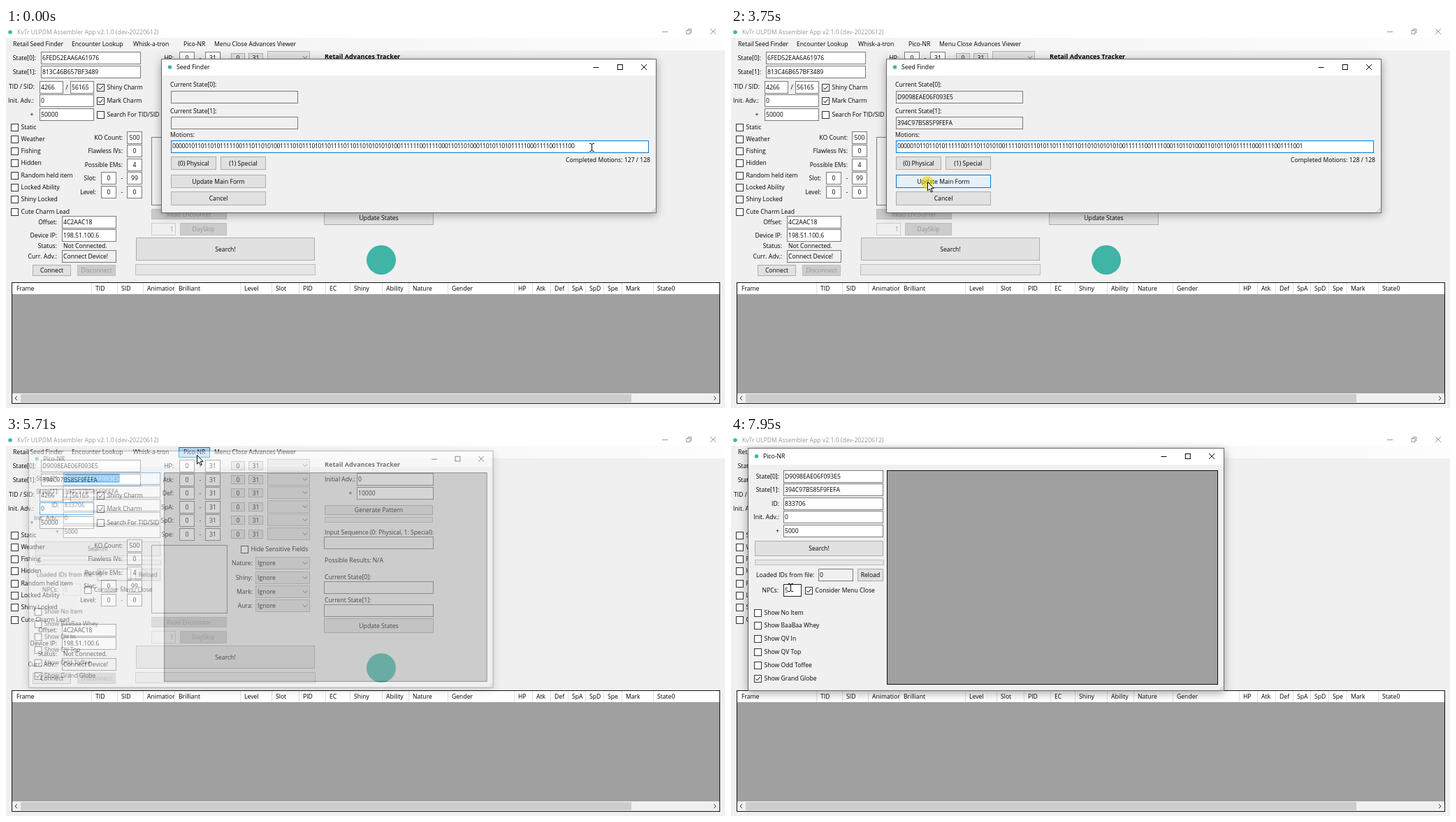
An HTML page with a canvas for the animation above (8 s loop, 1029 px wide and 544 px high).

```html
<!DOCTYPE html>
<html lang="en">
<head>
<meta charset="utf-8">
<title>Seed tool</title>
<style>
  html, body { margin: 0; width: 100%; height: 100%; overflow: hidden; background: #f0f0f0; }
  canvas { display: block; }
</style>
</head>
<body>
<canvas id="stage" width="1029" height="544"></canvas>
<script>
const LOOP = 8000, FONT = '8.65px "Open Sans", sans-serif';
const BLUE = '#0078d7', TEAL = '#3fb4a7', FACE = '#f0f0f0', MUTED = '#a0a0a0';
const stage = document.getElementById('stage').getContext('2d');
const layer = Object.assign(document.createElement('canvas'), { width: 1029, height: 544 });
const layerCtx = layer.getContext('2d');
let g = stage, mouse = [-1, -1], beam = false;

const BITS = '0000010110110101111100111011010100111101011101011011110110110101010101' +
  '001111110011110001101101000110101101011111000111100111100';
const OLD_STATE = ['6FED52EAA6A61976', '813C46B657BF3489'];
const NEW_STATE = ['D9098EAE06F093E5', '394C97B585F9FEFA'];

// Pointer way points: time, x, y
const PATH = [
  [0, 838, 171], [480, 838, 171], [1110, 824, 170], [1340, 493, 248], [1490, 493, 248],
  [1750, 345, 135], [1980, 300, 71], [2270, 304, 135], [2420, 304, 151], [2640, 232, 140],
  [2850, 262, 75], [3120, 262, 112], [3290, 262, 112], [3510, 281, 220], [3830, 281, 220],
  [4140, 275, 211], [4290, 275, 211], [4440, 240, 151], [4610, 240, 151], [4920, 266, 42],
  [5150, 302, 32], [5390, 273, 27], [6260, 273, 27], [6490, 215, 126], [6640, 165, 160],
  [6950, 111, 225], [7400, 111, 225], [7870, 85, 217], [8000, 85, 217]
];
const CLICKS = [[3680, 3830, 281, 221], [5540, 5630, 273, 28], [7200, 7350, 111, 225]];

function pointerAt(t) {
  const i = PATH.findIndex(p => p[0] > t), a = PATH[i - 1], b = PATH[i];
  const k = (t - a[0]) / (b[0] - a[0]);
  return [a[1] + (b[1] - a[1]) * k, a[2] + (b[2] - a[2]) * k];
}

const over = (x1, y1, x2, y2) =>
  mouse[0] >= x1 && mouse[0] < x2 && mouse[1] >= y1 && mouse[1] < y2;

function text(s, x, y, align = 'left', color = '#000', font = FONT) {
  g.font = font;
  g.textAlign = align;
  g.fillStyle = color;
  g.fillText(s, x, y + 3);
}
function rect(x1, y1, x2, y2, fill, stroke) {
  g.fillStyle = fill;
  g.fillRect(x1, y1, x2 - x1, y2 - y1);
  if (!stroke) return;
  g.strokeStyle = stroke;
  g.strokeRect(x1 + .5, y1 + .5, x2 - x1 - 1, y2 - y1 - 1);
}
function line(color, ...points) {
  g.strokeStyle = color;
  g.beginPath();
  for (let i = 0; i < points.length; i += 2) g.lineTo(points[i], points[i + 1]);
  g.stroke();
}
function dot(x, y, r, color) {
  g.fillStyle = color;
  g.beginPath();
  g.arc(x, y, r, 0, 7);
  g.fill();
}

// Text box 18 px tall around y; kind is 'read', 'off', 'focus', 'dark' or empty
function field(x1, x2, y, value = '', kind = '') {
  const hover = over(x1, y - 9, x2, y + 9);
  if (hover && kind !== 'off') beam = true;
  const border = kind === 'focus' ? BLUE : kind === 'off' ? '#ccc'
    : hover || kind === 'dark' ? '#222' : '#7a7a7a';
  const plain = kind === '' || kind === 'focus';
  rect(x1, y - 9, x2, y + 9, plain ? '#fff' : FACE, border);
  text(value, x1 + 2, y - .5, 'left', kind === 'off' ? MUTED : '#000');
}
function number(x, y, value) {
  field(x - 11, x + 11, y);
  text(value, x, y, 'center');
}
function button(x1, y1, x2, y2, label, off) {
  const hover = !off && over(x1, y1, x2, y2);
  rect(x1, y1, x2, y2, off ? '#ccc' : hover ? '#e5f1fb' : '#e1e1e1',
    off ? '#bfbfbf' : hover ? BLUE : '#adadad');
  text(label, (x1 + x2) / 2, (y1 + y2) / 2, 'center', off ? '#949494' : '#000');
}
function check(x, y, label, on) {
  rect(x, y - 5, x + 11, y + 6, '#fff', '#333');
  if (on) line('#000', x + 2.5, y + .5, x + 4.5, y + 3, x + 8.5, y - 2);
  text(label, x + 14.5, y);
}
function combo(x1, x2, y, label) {
  rect(x1, y - 9, x2, y + 9, '#e1e1e1', '#b4b4b4');
  text(label, x1 + 3, y);
  line('#555', x2 - 10, y - 1.5, x2 - 7, y + 1.5, x2 - 4, y - 1.5);
}
const bar = (x1, y1, x2, y2) => rect(x1, y1, x2, y2, '#e6e6e6', '#bcbcbc');

function captionButtons(x, y, gap, color, restored) {
  line(color, x - 4, y + .5, x + 4, y + .5);
  const m = x + gap, c = x + 2 * gap;
  g.strokeStyle = color;
  if (restored) {
    g.strokeRect(m - 3.5, y - 1.5, 5, 5);
    line(color, m - 1.5, y - 2, m - 1.5, y - 3.5, m + 3.5, y - 3.5, m + 3.5, y + 1.5, m + 2, y + 1.5);
  } else g.strokeRect(m - 3.5, y - 3.5, 7, 7);
  line(color, c - 4, y - 4, c + 4, y + 4);
  line(color, c - 4, y + 4, c + 4, y - 4);
}

function mainWindow(state, active, lit) {
  rect(0, 0, 1029, 544, FACE);
  rect(0, 0, 1029, 14, '#fff');
  const strip = g.createLinearGradient(0, 0, 1029, 0);
  strip.addColorStop(0, FACE);
  strip.addColorStop(1, '#fdfdfd');
  rect(0, 14, 1029, 32, strip);
  dot(6, 6, 2.8, TEAL);
  const ink = active ? '#000' : '#999';
  text('KvTr ULPDM Assembler App v2.1.0 (dev-20220612)', 16, 6, 'left', ink);
  captionButtons(943, 5, 34.5, ink, true);

  if (lit) rect(247, 16, 292, 31, '#b3d7f3', BLUE);
  [['Retail Seed Finder', 10], ['Encounter Lookup', 94], ['Whisk-a-tron', 182],
   ['Pico-NR', 254], ['Menu Close Advances Viewer', 298]].forEach(([s, x]) => text(s, x, 23));

  state.forEach((s, i) => {
    text(`State[${i}]:`, 43, 43 + 20 * i, 'right');
    field(50, 193, 43 + 20 * i, s);
  });
  text('TID / SID:', 4, 84);
  field(48, 82, 85, '4266');
  text('/', 87, 85, 'center');
  field(92, 126, 85, '56165');
  text('Init. Adv.:', 3, 104);
  field(48, 126, 104, '0', active || lit ? 'focus' : '');
  text('+', 37, 124, 'center');
  field(48, 126, 124, '50000');
  check(130, 85, 'Shiny Charm', true);
  check(130, 104, 'Mark Charm', true);
  check(130, 124, 'Search For TID/SID');
  ['Static', 'Weather', 'Fishing', 'Hidden', 'Random held item', 'Locked Ability',
   'Shiny Locked', 'Cute Charm Lead'].forEach((s, i) => check(7, Math.round(141.5 + 17.3 * i), s));

  [['KO Count:', '500'], ['Flawless IVs:', '0'], ['Possible EMs:', '4'],
   ['Slot:', '99', 1], ['Level:', '0', 1]].forEach(([s, v, range], i) => {
    const y = Math.round(156.5 + 19.6 * i);
    text(s, range ? 129 : 167, y, 'right');
    if (range) { number(147, y, '0'); text('-', 166, y, 'center'); }
    number(184, y, v);
  });

  text('Offset:', 73, 278, 'right');
  field(80, 158, 278, '4C2AAC18');
  text('Device IP:', 73, 297, 'right');
  field(80, 158, 297, '198.51.100.6');
  text('Status:', 73, 312, 'right');
  text('Not Connected.', 82, 312);
  text('Curr. Adv.:', 73, 327, 'right');
  field(80, 158, 327, 'Connect Device!', 'read');
  button(38, 339, 93, 355, 'Connect');
  button(102, 339, 157, 355, 'Disconnect', true);
  button(186, 300, 442, 333, 'Search!');
  bar(185, 338, 443, 354);

  ['HP:', 'Atk:', 'Def:', 'SpA:', 'SpD:', 'Spe:'].forEach((s, i) => {
    const y = Math.round(43 + 19.6 * i);
    text(s, 240, y, 'right');
    number(259, y, '0');
    text('-', 278, y, 'center');
    number(296, y, '31');
    button(322, y - 7, 342, y + 6, '0');
    button(347, y - 7, 368, y + 6, '31');
    combo(374, 435, y - 1, '');
  });
  rect(208, 156, 317, 254, FACE, '#7a7a7a');
  button(208, 259, 316, 274, 'Read Encounter', true);
  field(208, 243, 288, '', 'off');
  text('1', 240, 288, 'right', MUTED);
  button(249, 279, 316, 297, 'DaySkip', true);
  check(336, 162, 'Hide Sensitive Fields');
  ['Nature:', 'Shiny:', 'Mark:', 'Aura:'].forEach((s, i) => {
    const y = Math.round(182.4 + 20.3 * i);
    text(s, 353, y, 'right');
    combo(357, 435, y, 'Ignore');
  });

  text('Retail Advances Tracker', 456, 41, 'left', '#000', 'bold 9.1px "Open Sans", sans-serif');
  text('Initial Adv.:', 456, 62);
  field(502, 612, 62, '0');
  text('+', 493, 82, 'center');
  field(502, 612, 82, '10000');
  button(456, 99, 611, 113, 'Generate Pattern');
  bar(456, 116, 611, 124);
  text('Input Sequence (0: Physical, 1: Special):', 456, 138);
  field(455, 612, 153, '', 'read');
  text('Possible Results: N/A', 456, 178);
  text('Current State[0]:', 456, 202);
  field(455, 612, 217, '', 'read');
  text('Current State[1]:', 456, 235);
  field(455, 612, 250, '', 'read');
  button(455, 261, 612, 282, 'Update States');
  dot(537, 332, 21, TEAL);

  rect(8, 364, 1022, 538, MUTED, '#111');
  rect(9, 365, 1021, 381, '#fff');
  [['Frame', 15], ['TID', 128], ['SID', 165], ['Animatior', 202], ['Brilliant', 247], ['Level', 341],
   ['Slot', 386], ['PID', 425], ['EC', 463], ['Shiny', 498], ['Ability', 544], ['Nature', 582],
   ['Gender', 638], ['HP', 733], ['Atk', 759], ['Def', 785], ['SpA', 810], ['SpD', 835],
   ['Spe', 861], ['Mark', 887], ['State0', 932]].forEach(([s, x], i) => {
    if (i) rect(x - 6, 365, x - 5, 381, '#dedede');
    text(s, x, 373);
  });
  rect(9, 523, 1021, 537, FACE);
  rect(21, 524, 895, 536, '#cdcdcd');
  line('#333', 16, 527, 13, 530, 16, 533);
  line('#333', 1013, 527, 1016, 530, 1013, 533);
}

function dialog(x1, y1, x2, y2, title) {
  beam = false;
  g.save();
  g.shadowColor = 'rgba(0,0,0,.35)';
  g.shadowBlur = 12;
  g.shadowOffsetY = 3;
  rect(x1, y1, x2, y2, FACE);
  g.restore();
  rect(x1, y1, x2, y2, FACE, '#666');
  rect(x1 + 1, y1 + 1, x2 - 1, y1 + 24, '#fff');
  dot(x1 + 12.5, y1 + 12, 2.8, TEAL);
  text(title, x1 + 22, y1 + 12);
  captionButtons(x2 - 86.5, y1 + 12, 34.3, '#000');
  // Resize grip: a triangle of six small squares
  for (let row = 0; row < 3; row++)
    for (let col = 0; col < 3 - row; col++) {
      const x = x2 - 3 - 2 * col, y = y2 - 3 - 2 * row;
      rect(x, y, x + 1, y + 1, MUTED);
    }
}

function seedFinder(t) {
  const done = t >= 480;
  dialog(222, 44, 931, 265, 'Seed Finder');
  NEW_STATE.forEach((s, i) => {
    text(`Current State[${i}]:`, 235, 81 + 38 * i);
    field(236, 418, 99 + 37 * i, done ? s : '', t > 1900 && t < 3290 ? 'dark' : 'read');
  });
  text('Motions:', 235, 153);
  field(236, 920, 170, '', 'focus');
  g.letterSpacing = '-0.4px';
  text(BITS + (done ? '1' : ''), 238, 169);
  g.letterSpacing = '0px';
  text(`Completed Motions: ${done ? 128 : 127} / 128`, 922, 189, 'right');
  button(236, 184, 301, 203, '(0) Physical');
  button(307, 184, 372, 203, '(1) Special');
  button(236, 210, 372, 229, 'Update Main Form');
  button(236, 234, 372, 254, 'Cancel');
}

function drawFinder(t) {
  const on = t >= 7280;
  dialog(24, 17, 706, 365, 'Pico-NR');
  ['State[0]:', 'State[1]:', 'ID:', 'Init. Adv.:', '+'].forEach((s, i) => {
    const y = Math.round(57.5 + 19.6 * i);
    text(s, 69, y, 'right');
    field(75, 218, y, [...NEW_STATE, '833706', '0', '5000'][i], i || on ? '' : 'focus');
  });
  if (!on) {
    rect(77, 51, 77 + g.measureText(NEW_STATE[0]).width + 1, 64, BLUE);
    text(NEW_STATE[0], 77, 57.5, 'left', '#fff');
  }
  button(34, 150, 218, 172, 'Search!');
  bar(34, 177, 219, 185);
  text('Loaded IDs from file:', 36, 199);
  field(125, 175, 199, '0', 'read');
  button(181, 190, 218, 208, 'Reload');
  text('NPCs:', 68, 221, 'right');
  field(75, 101, 221, '5', on ? '' : 'off');
  check(106, 221, 'Consider Menu Close', on);
  ['No Item', 'BaaBaa Whey', 'QV In', 'QV Top', 'Odd Toffee', 'Grand Globe'].forEach((s, i) =>
    check(33, Math.round(252.5 + 18.8 * i), 'Show ' + s, i === 5));
  rect(223, 49, 697, 356, MUTED, '#111');
}

// Paints a dialog on its own layer, then blends it in, growing around (cx, cy)
function blend(drawDialog, t, alpha, cx, cy) {
  g = layerCtx;
  g.clearRect(0, 0, 1029, 544);
  drawDialog(t);
  g = stage;
  const scale = 1 - .08 * (1 - alpha) ** 2;
  g.save();
  g.globalAlpha = alpha;
  g.translate(cx, cy);
  g.scale(scale, scale);
  g.drawImage(layer, -cx, -cy);
  g.restore();
}

function pointer(x, y) {
  g.save();
  g.translate(Math.round(x), Math.round(y));
  if (beam) {
    line('#000', -3, -5.5, -1, -5.5, .5, -4.5, .5, 4.5, -1, 5.5, -3, 5.5);
    line('#000', 4, -5.5, 2, -5.5, .5, -4.5, .5, 4.5, 2, 5.5, 4, 5.5);
  } else {
    const shape = new Path2D('M.5 .5V13L3.3 10.3 5.4 15 7.3 14.2 5.3 9.6H9.2Z');
    g.fillStyle = '#fff';
    g.fill(shape);
    g.strokeStyle = '#000';
    g.stroke(shape);
  }
  g.restore();
}

function draw(t) {
  const pos = pointerAt(t), clamp = v => Math.max(0, Math.min(1, v));
  const closing = 1 - clamp((t - 3830) / 170);
  const opening = clamp((t - 5630) / 180);
  const active = t >= 3830 && t < 5630;
  beam = false;
  mouse = active ? pos : [-1, -1];
  const lit = t > 4610 && pos[0] >= 247 && pos[0] < 292 && pos[1] >= 16 && pos[1] < 31;
  mainWindow(t < 3830 ? OLD_STATE : NEW_STATE, active, lit);
  mouse = active ? [-1, -1] : pos;
  if (closing > 0) blend(seedFinder, t, closing, 576, 154);
  if (opening > 0) blend(drawFinder, t, opening, 350, 180);
  for (const [from, to, x, y] of CLICKS)
    if (t >= from && t < to) dot(x, y, 9, 'rgba(240,215,0,.6)');
  if (t < 480 || t >= 1110) pointer(...pos);
}

function tick() {
  draw(performance.now() % LOOP);
  requestAnimationFrame(tick);
}
tick();
</script>
</body>
</html>
```
